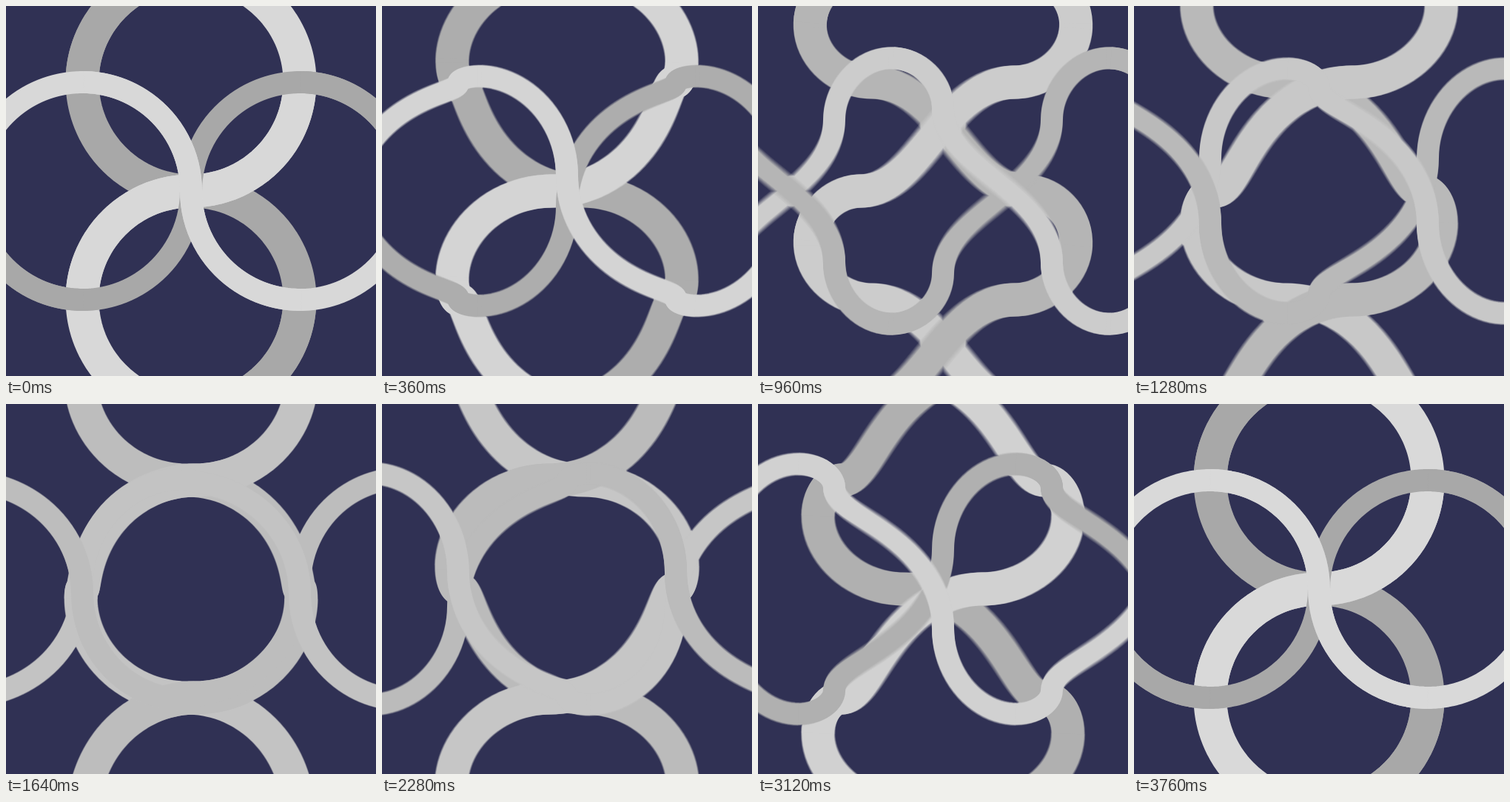
An HTML page with a canvas that plays this animation: 500x500 px, repeating every 3800 ms.

```html
<!DOCTYPE html>
<html lang="en">
<head>
<meta charset="utf-8">
<title>Interlaced waves</title>
<style>
  html, body { margin: 0; width: 100%; height: 100%; overflow: hidden; background: #303154; }
  canvas { display: block; width: 500px; height: 500px; }
</style>
</head>
<body>
<canvas id="stage" width="500" height="500"></canvas>
<script>
const SIZE = 500, MID = 250, R = 147, EDGE = MID - R;
const LOOP = 3800, STEP = 40, FRAMES = LOOP / STEP;
const SHUTTER = 36, SAMPLES = 9;
const BACKGROUND = '#303154', LIGHT = 217, DARK = 168;

const stage = document.getElementById('stage').getContext('2d');
const buffer = document.createElement('canvas');
buffer.width = buffer.height = SIZE;
const ctx = buffer.getContext('2d');

// Symmetric ease-in-out: cubic Bezier (0.42, 0, 0.58, 1), solved by bisection.
function easeInOut(x) {
  let low = 0, high = 1, s = 0.5;
  for (let i = 0; i < 24; i++) {
    s = (low + high) / 2;
    const r = 1 - s;
    const value = 3 * r * s * (0.42 * r + 0.58 * s) + s ** 3;
    if (value < x) low = s; else high = s;
  }
  return s * s * (3 - 2 * s);
}

// Cosine-like wave made of quarter circles; quarter index q, position w in 0..1.
function arcWave(q, w) {
  const k = ((q % 4) + 4) % 4;
  const d = k % 2 ? 1 - w : w;
  const h = Math.sqrt(Math.max(0, 1 - d * d));
  return k === 1 || k === 2 ? -h : h;
}

// Points [u, g] of the wave blended from two fixed waves a quarter apart.
function wavePoints(angle) {
  const c = Math.cos(angle), s = Math.sin(angle), n = 36, points = [];
  for (let q = -6; q < 6; q++) {
    for (let k = 1; k <= n; k++) {
      const w = Math.sin(Math.PI * k / n / 2) ** 2;
      points.push([q + w, c * arcWave(q, w) + s * arcWave(q - 1, w)]);
    }
  }
  return points;
}

const thin = { width: 30, front: -1, place: (u, g) => [EDGE + R * u, MID - R * g] };
const thick = { width: 45, front: 1, place: (u, g) => [MID + R * g, EDGE - R * u] };

// Strokes the whole wave, or only the runs whose slope has the front sign.
function strokeWave(points, band, side, color, frontOnly) {
  ctx.beginPath();
  let drawing = false;
  for (let i = 1; i < points.length; i++) {
    const [u0, g0] = points[i - 1], [u1, g1] = points[i];
    if (frontOnly && (g1 - g0) * side * band.front <= 0) {
      drawing = false;
      continue;
    }
    if (!drawing) ctx.moveTo(...band.place(u0, g0 * side));
    ctx.lineTo(...band.place(u1, g1 * side));
    drawing = true;
  }
  ctx.lineWidth = band.width;
  ctx.strokeStyle = color;
  ctx.stroke();
}

const gray = v => `rgb(${v},${v},${v})`;

function drawMoment(time) {
  const phase = (time / LOOP + 1) % 1;
  const turn = phase * 2, half = Math.floor(turn);
  const points = wavePoints(Math.PI / 2 * (half + easeInOut(turn - half)));
  const fade = (LIGHT - DARK) * phase;
  const strands = [[-1, gray(DARK + fade)], [1, gray(LIGHT - fade)]];

  ctx.fillStyle = BACKGROUND;
  ctx.fillRect(0, 0, SIZE, SIZE);
  ctx.lineJoin = 'round';
  for (const band of [thick, thin]) {
    for (const frontOnly of [false, true]) {
      for (const [side, color] of strands) strokeWave(points, band, side, color, frontOnly);
    }
  }
}

// Averages several moments within the shutter time for motion blur.
function drawFrame(frame) {
  const time = (frame + 1) * STEP;
  for (let i = 0; i < SAMPLES; i++) {
    drawMoment(time + SHUTTER * ((i + 0.5) / SAMPLES - 0.5));
    stage.globalAlpha = 1 / (i + 1);
    stage.drawImage(buffer, 0, 0);
  }
}

let start = null, shown = 0;
function tick(now) {
  if (start === null) start = now;
  const frame = Math.floor(Math.max(0, now - start) / STEP) % FRAMES;
  if (frame !== shown) drawFrame(shown = frame);
  requestAnimationFrame(tick);
}

drawFrame(0);
requestAnimationFrame(tick);
</script>
</body>
</html>
```
